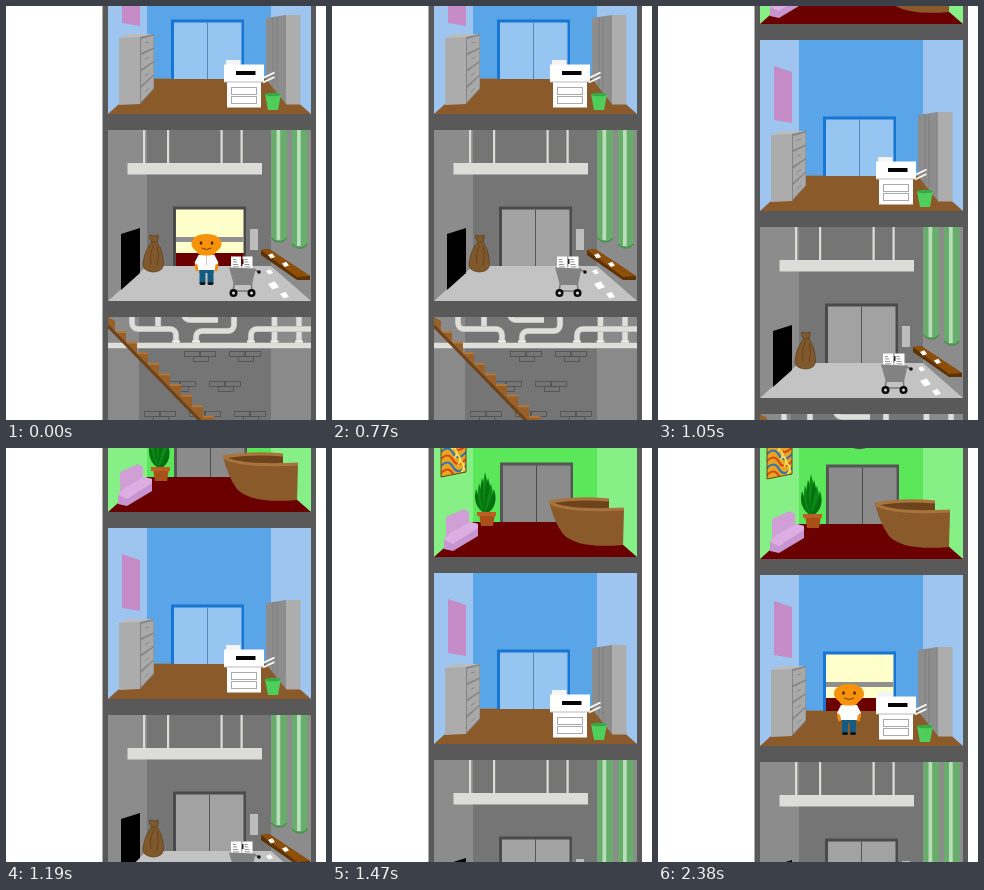
Recreate the animation shown at these times as an HTML page with a canvas. Size 320x414 px, loop 2.59 s.

```html
<!DOCTYPE html>
<html lang="en">
<head>
<meta charset="utf-8">
<title>Elevator ride</title>
<style>
html, body { margin: 0; width: 100%; height: 100%; overflow: hidden; background: #fff; }
canvas { display: block; width: 320px; height: 414px; }
</style>
</head>
<body>
<canvas id="stage" width="320" height="414"></canvas>
<script>
const ctx = document.getElementById('stage').getContext('2d');
const LOOP = 2590, STEP = 70, PITCH = 187, ROOM = 171, RIDE = 190;
const clamp = v => Math.max(0, Math.min(1, v));
const mix = (a, b, u) => a + (b - a) * u;
const quadOut = u => 1 - (1 - u) * (1 - u);
const sineOut = u => Math.sin(u * Math.PI / 2);

function rect(x1, y1, x2, y2, color) {
  ctx.fillStyle = color;
  ctx.fillRect(x1, y1, x2 - x1, y2 - y1);
}
function trace(pts) {
  ctx.beginPath();
  for (let i = 0; i < pts.length; i += 2) ctx.lineTo(pts[i], pts[i + 1]);
}
function poly(color, ...pts) {
  trace(pts);
  ctx.fillStyle = color;
  ctx.fill();
}
function line(color, width, ...pts) {
  trace(pts);
  ctx.strokeStyle = color;
  ctx.lineWidth = width;
  ctx.stroke();
}
function oval(x, y, rx, ry, color) {
  ctx.beginPath();
  ctx.ellipse(x, y, rx, ry, 0, 0, 7);
  ctx.fillStyle = color;
  ctx.fill();
}
function shape(path, fill, stroke, width = 1) {
  const p = new Path2D(path);
  if (fill) { ctx.fillStyle = fill; ctx.fill(p); }
  if (stroke) { ctx.strokeStyle = stroke; ctx.lineWidth = width; ctx.stroke(p); }
}
// upright panel seen at an angle: top and bottom differ at its two edges
function panel(color, x1, top1, bottom1, x2, top2, bottom2) {
  poly(color, x1, top1, x2, top2, x2, bottom2, x1, bottom1);
}

function shell(side, back, floor, edge = 136) {
  rect(102, 0, 305, ROOM, side);
  rect(141, 0, 265, edge, back);
  poly(floor, 102, ROOM, 141, edge, 265, edge, 305, ROOM);
}

// open: 0 closed, 1 fully open
function elevator(x, frame, door, seam, open, rider) {
  const l = x + 3, r = x + 70.5, mid = x + 37, gap = 34 * open;
  rect(x, 76.5, x + 73, 136, frame);
  if (open > 0) {
    rect(l, 79.5, r, 123, '#ffffcc');
    rect(l, 107, r, 112, '#8f8f8f');
    rect(l, 123, r, 136, '#6b0000');
    rider();
  }
  if (open < 1) {
    rect(l, 79.5, Math.max(l, mid - gap), 136, door);
    rect(Math.min(r, mid + gap), 79.5, r, 136, door);
    if (open === 0) rect(mid - 1, 79.5, mid, 136, seam);
  }
}

// near: 0 inside the elevator, 1 at the front
function man(x, near, frontY, back, stride) {
  const s = mix(0.69, 1, near);
  ctx.save();
  ctx.translate(x, mix(129.5, frontY, near));
  ctx.scale(s, s);
  for (const d of [-1, 1]) {
    const lift = stride === d ? 2 : 0;
    rect(d, -16, d * 7, -2 - lift, '#155a80');
    oval(d * 4, -1.4 - lift, 3, 1.5, '#111');
    line('#f28c0c', 3, d * 9.5, -24, d * 10.5, -19, d * 9, -14);
    poly('#fff', 0, -30, d * 8, -30, d * 12, -22, d * 9, -20, d * 8, -15, 0, -15);
  }
  rect(-7, -16, 7, -12, '#155a80');
  rect(-8, -20, 8, -15, '#fff');
  shape('M-15 -41C-15 -48 -8 -51 0 -51S15 -48 15 -41C15 -36 10 -35 8 -31C5 -29 -5 -29 -8 -31C-10 -35 -15 -36 -15 -41Z', '#f7920b');
  if (!back) {
    for (const d of [-5.5, 5.5]) oval(d, -42, 1.3, 1.8, '#4a2500');
    shape('M-5 -37Q0 -34 5 -37', null, '#6b3500', 0.9);
  }
  ctx.restore();
}

function lobby() {
  shell('#86ef86', '#5ae85a', '#6b0000');
  elevator(168, '#555', '#8b8b8b', '#4c4c4c', 0);
  oval(201.5, 58, 8, 3.2, '#595959');

  // painting
  const art = 'M109 42L134 48V86L109 91Z';
  ctx.save();
  ctx.clip(new Path2D(art));
  rect(109, 40, 134, 92, '#e8a51f');
  for (let i = 0; i < 7; i++) {
    const y = 46 + i * 7;
    shape(`M108 ${y}q8 -9 13 0t14 -2`, null, i % 2 ? '#2d75b5' : '#d9481c', 2.2);
    shape(`M${111 + i * 3.5} ${y - 6}q6 5 1 11`, null, '#f8e25a', 1.8);
  }
  ctx.restore();
  shape(art, null, '#5c4a14');

  // sofa
  shape('M114 131L132 123L137 126V139L118 152H114Z', '#cf9fd6');
  shape('M112 154L118 147L138 136L146 138V150L121 165L112 163Z', '#c795cf');
  shape('M112 154L118 147L138 136L146 138V142L121 158Z', '#dcaee2');

  // plant
  for (let i = 0; i < 7; i++) {
    const d = (i - 3) / 3, x = 153 + d * 9, y = 86 + 17 * Math.abs(d);
    shape(`M152 127Q${x - 4} ${y + 16} ${x} ${y}Q${x + 5} ${y + 16} 156 127Z`, i % 2 ? '#0a8a14' : '#067010');
  }
  shape('M147 128H163L161 140H149Z', '#a9501a');
  rect(145, 126, 164, 130, '#bd5f22');

  // desk
  shape('M217 115Q245 110 277 113V122L292 123L291 159Q245 163 231 148Q221 134 217 115Z', '#8b5a2b');
  shape('M222 117Q250 112 277 115V122Q246 125 230 122Z', '#6d431c');
  shape('M217 116Q245 111 277 114M217 116Q232 126 292 123', null, '#a8743e', 3);
}

function office(open, rider) {
  shell('#9dc5f0', '#5aa5e8', '#8b5a2b', 135.5);
  elevator(165, '#1775d3', '#95c5f0', '#5388bb', open, rider);
  panel('#c58cc8', 116, 26, 80, 134, 32, 83);

  // filing cabinet
  poly('#bcbcbc', 113, 95, 122, 91, 148, 91, 134, 94);
  panel('#acacac', 113, 95, 162, 134, 94, 161);
  panel('#858585', 134, 94, 161, 148, 91, 146);
  for (let i = 0; i < 4; i++) {
    const l = 96 + i * 16.3, r = 92.5 + i * 13.5;
    panel('#a9a9a9', 135, l, l + 14, 147.5, r, r + 12);
    line('#8a8a8a', 1, 139, l + 4, 143, l + 3 - i);
  }

  // lockers
  panel('#8d8d8d', 260, 75, 136, 280, 72, 161);
  for (const x of [267, 271]) line('#7b7b7b', 0.8, x, 74, x, x - 123);
  rect(280, 72, 294.5, 161.5, '#adadad');

  // printer
  for (const y of [135, 139.5]) line('#fff', 1.8, 257, y, 268.5, y - 5.5);
  rect(220, 117, 234.5, 123, '#f4f4f4');
  rect(221, 138, 255, 164.5, '#fff');
  rect(218, 121.5, 258, 139, '#fff');
  rect(218, 138.5, 258, 139.5, '#bbb');
  rect(230, 128, 249.5, 132, '#050505');
  ctx.strokeStyle = '#aaa';
  ctx.lineWidth = 1;
  for (const y of [144.5, 153.5]) ctx.strokeRect(225.5, y, 25, 7);

  // bin
  shape('M259 151H275L272 167H262Z', '#50ce5c');
  oval(267, 151.5, 8, 1.8, '#37aa45');
}

function paper(x, y, w) {
  poly('#fff', x, y, x + w * 0.6, y - w * 0.25, x + w, y + w * 0.3, x + w * 0.4, y + w * 0.5);
}

function storage(open, rider) {
  shell('#8c8c8c', '#757575', '#c3c3c3');
  elevator(167, '#4a4a4a', '#a2a2a2', '#555', open, rider);

  // hanging beam
  for (const x of [137, 161, 214.5, 234.5]) rect(x, 0, x + 2.2, 34, '#dcdcd8');
  rect(121.5, 33, 256, 44.5, '#dcdcd8');

  panel('#000', 115, 104, 160, 134, 98, 143);
  rect(244, 99, 252, 120, '#bdbdbd');

  // sack
  shape('M146 112Q142 107 144 105Q148 107 152 105Q153 108 151 112Q157 120 157.5 134Q157 142 147 142Q136 141 137 133Q139 119 146 112Z', '#7f592c', '#5a3c18', 0.7);
  shape('M145 112H151M148 114Q143 124 145 134M151 116Q154 125 151 136', null, '#5f3f1a', 0.8);

  // green tubes
  for (const [x, y] of [[265.5, 108], [286, 114]]) {
    shape(`M${x} 0h15.5V${y}q-7.5 8 -15.5 0Z`, '#69ad6c');
    rect(x + 5, 0, x + 8.7, y + 2, '#b9dfba');
    shape(`M${x} ${y}q8 8 15.5 0`, null, '#4a8f50', 1.5);
  }

  // shelf and loose paper
  shape('M255 120L263 119L304 146V150H291L255 125Z', '#5d3204');
  shape('M255 120L263 119L304 146L291 147Z', '#8e4f0a');
  paper(262, 125, 7);
  paper(276, 133.5, 7);
  paper(260, 141, 7);
  paper(262, 154, 11);
  paper(274, 164, 9);

  // cart
  for (const x of [225, 236.5]) {
    rect(x, 126.5, x + 10, 139, '#fff');
    for (let i = 0; i < 4; i++) rect(x + 2, 129 + i * 2.5, x + 5 + i * 5 % 4, 129.8 + i * 2.5, '#777');
  }
  rect(236, 129, 237.5, 134, '#222');
  line('#777', 1.5, 229, 150, 227, 161, 246, 161, 245, 150);
  shape('M223 137.5L249.5 138.5L246 155H228Z', '#828282');
  line('#777', 1.5, 249, 140, 253, 142);
  oval(253, 142, 1.8, 1.8, '#111');
  for (const x of [227.5, 245.5]) {
    oval(x, 163, 4, 4, '#0a0a0a');
    oval(x, 163, 1.5, 1.5, '#ddd');
  }
}

function pipe(...pts) {
  for (const [color, width] of [['#b0b0ad', 6.2], ['#dededa', 5]]) {
    ctx.beginPath();
    ctx.moveTo(pts[0], pts[1]);
    for (let i = 2; i < pts.length - 2; i += 2) ctx.arcTo(pts[i], pts[i + 1], pts[i + 2], pts[i + 3], 6);
    ctx.lineTo(...pts.slice(-2));
    ctx.strokeStyle = color;
    ctx.lineWidth = width;
    ctx.stroke();
  }
}

function cellar() {
  rect(102, 0, 305, ROOM, '#8a8a8a');
  rect(133, 0, 265, ROOM, '#757575');

  // brick patches
  ctx.strokeStyle = '#505050';
  ctx.lineWidth = 0.8;
  for (let i = 1; i < 8; i++) {
    const x = 133.5 + i * 45 % 110, y = 34.5 + Math.floor(i * 45 / 110) * 30;
    for (const [dx, dy] of [[0, 0], [16, 0], [9, 5]]) ctx.strokeRect(x + dx, y + dy, 15, 5);
  }

  // pipes
  for (const x of [152, 268.5, 293]) pipe(x, 0, x, x < 200 ? 12 : 28);
  pipe(126, 0, 126, 12, 170, 12, 170, 28);
  pipe(190, 28, 190, 14, 228, 14, 228, 0);
  pipe(245, 28, 245, 12, 305, 12);
  pipe(178, 0, 178, 3, 212, 3);
  pipe(102, 28.5, 305, 28.5);
  for (const x of [170, 190, 245, 268.5, 293]) rect(x - 4, 23.5, x + 4, 25.5, '#efefec');

  // stairs
  const steps = [102, 10, 102, 0];
  for (let i = 0; i < 11; i++) steps.push(109 + i * 11, 4 + i * 10.6, 109 + i * 11, 14.6 + i * 10.6);
  poly('#99612a', ...steps, 215, 124);
  for (let i = 0; i < 10; i++) rect(109 + i * 11, 14 + i * 10.6, 120 + i * 11, 16 + i * 10.6, '#b0763a');
  line('#6f431a', 3, 102, 9, 210, 120);
}

function draw(time) {
  const k = Math.floor(time % LOOP / STEP), t = k * STEP;
  const span = (from, length) => clamp((t - from) / length);
  const scroll = Math.round(RIDE * quadOut(span(840, 700)));
  const walk = u => u > 0 && u < 1 ? (k % 2 ? 1 : -1) : 0;
  const away = span(0, 420), toward = span(1890, 490);

  const leave = () => man(200.5, 1 - away, 155, away > 0, walk(away));
  const arrive = () => man(191, toward, 160, false, walk(toward));
  const floors = [
    lobby,
    () => office(sineOut(span(1540, 350)), arrive),
    () => storage(1 - sineOut(span(420, 350)), leave),
    cellar
  ];

  rect(0, 0, 320, 414, '#fff');
  rect(96.5, 0, 310, 414, '#595959');
  floors.forEach((paint, i) => {
    const top = 124 + scroll + (i - 2) * PITCH;
    if (top > 414 || top + ROOM < 0) return;
    ctx.save();
    ctx.translate(0, top);
    ctx.beginPath();
    ctx.rect(102, 0, 203, ROOM);
    ctx.clip();
    paint();
    ctx.restore();
  });
}

const start = performance.now();
function tick() {
  draw(performance.now() - start);
  requestAnimationFrame(tick);
}
tick();
</script>
</body>
</html>
```
